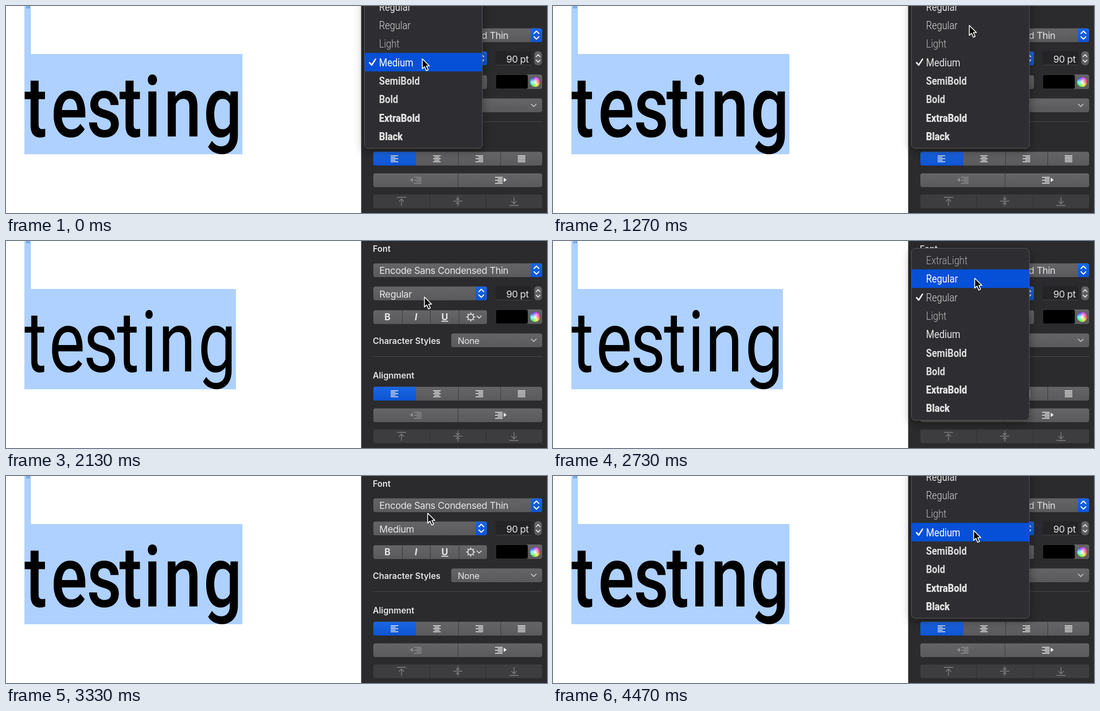
These frames come from a looping animation (1000x384 px, 4540 ms). An HTML page:

```html
<!DOCTYPE html>
<html lang="en">
<head>
<meta charset="utf-8">
<title>Choosing a font weight</title>
<style>
html, body { margin: 0; width: 100%; height: 100%; overflow: hidden; background: #fff; }
svg { display: block; width: 100%; height: 100%; }
text { font-family: Inter, "Liberation Sans", sans-serif; fill: #e6e6e7; white-space: pre; }
.label { font-size: 15.5px; font-weight: 600; }
.value { font-size: 17.5px; letter-spacing: -.4px; }
.narrow { font-family: Roboto, "Noto Sans", sans-serif; }
.word { font-size: 157px; fill: #000; }
.item { font-size: 20.5px; }
.line { fill: none; stroke-linecap: round; stroke-linejoin: round; }
</style>
</head>
<body>
<svg id="stage" viewBox="0 0 1000 384" preserveAspectRatio="none">
  <defs>
    <linearGradient id="grey" x2="0" y2="1"><stop stop-color="#656466"/><stop offset="1" stop-color="#5a595b"/></linearGradient>
    <linearGradient id="blue" x2="0" y2="1"><stop stop-color="#1a66e4"/><stop offset="1" stop-color="#0d54d2"/></linearGradient>
    <radialGradient id="glow"><stop stop-color="#fff"/><stop offset="1" stop-color="#fff" stop-opacity="0"/></radialGradient>
    <filter id="shadow" x="-20%" y="-20%" width="140%" height="140%">
      <feDropShadow dx="0" dy="5" stdDeviation="9" flood-opacity=".42"/>
    </filter>
  </defs>
</svg>
<script>
const LOOP = 4540, STEPS = 68, ROW = 34.3;
const WORD_SCALE = 0.8, ITEM_SCALE = 0.85;
const stage = document.getElementById("stage");

function add(tag, attrs, parent = stage, content) {
  const node = document.createElementNS("http://www.w3.org/2000/svg", tag);
  for (const key in attrs) node.setAttribute(key, attrs[key]);
  if (content !== undefined) node.textContent = content;
  parent.appendChild(node);
  return node;
}
const set = (node, attrs) => { for (const key in attrs) node.setAttribute(key, attrs[key]); };
const box = (x, y, width, height, fill, rx = 0, parent) => add("rect", { x, y, width, height, fill, rx }, parent);
const label = (x, y, content, cls, more = {}) => add("text", { x, y, class: cls, ...more }, stage, content);
const line = (d, stroke, width = 1.6, parent) =>
  add("path", { d, stroke, "stroke-width": width, class: "line" }, parent);

// Document with the selected word
const selection = box(34, 89, 403, 186, "#aed1ff");
box(34, 0, 12, 89.5, "#aed1ff");
line("M39 0V4M42.6 0V4", "#4b7fcb", 1.6);
const word = add("text", { class: "narrow word", y: 242.5, transform: `scale(${WORD_SCALE} 1)` }, stage, "testing");
const LOOKS = {
  Medium: { weight: 500, width: 403, at: [34, 83, 149, 209.5, 254.5, 291.5, 365] },
  Regular: { weight: 400, width: 391, at: [34, 79.5, 143, 205, 249, 281.5, 355] }
};

// Inspector panel
box(656.5, 0, 343.5, 384, "#2b2a2c");

function bar(x, y, width, splits = [], fill = "url(#grey)", gap = "#3a393b") {
  box(x, y + .5, width, 25.5, fill, 4);
  for (const s of splits) box(s, y + .5, 1, 25.5, gap);
}
function arrows(x, y) {
  add("path", { d: `M${x} ${y + .5}h17q4 0 4 4v17.5q0 4 -4 4h-17z`, fill: "url(#blue)" });
  line(`M${x + 6} ${y + 10}l4.5 -4.5l4.5 4.5m0 6l-4.5 4.5l-4.5 -4.5`, "#fff", 1.8);
}

label(678, 20, "Font", "label");
bar(679, 41, 312);
label(690, 61, "Encode Sans Condensed Thin", "value");
arrows(970, 41);

bar(679, 84, 210);
const style = label(690, 104.5, "", "value");
arrows(868, 84);
box(905, 84, 66, 26, "#242326");
box(905, 109, 66, 1, "#454446");
label(966, 104.5, "90 pt", "value", { "text-anchor": "end" });
box(976.5, 84, 14, 26, "url(#grey)", 6);
line("M980 94l3.5 -3.8l3.5 3.8m0 6.4l-3.5 3.8l-3.5 -3.8", "#e6e6e7", 1.7);

bar(679, 128, 210, [732, 784, 837]);
const mark = (x, s, more) => label(x, 147, s, "", { "font-size": 17, "font-weight": 700, "text-anchor": "middle", ...more });
mark(705, "B");
mark(758, "I", { "font-style": "italic" });
mark(811, "U", { "text-decoration": "underline" });
for (let i = 0; i < 8; i++)
  add("path", { d: "M859 134.8v-2", stroke: "#e6e6e7", "stroke-width": 2, transform: `rotate(${i * 45} 859 141)` });
add("circle", { cx: 859, cy: 141, r: 5.3, fill: "none", stroke: "#e6e6e7", "stroke-width": 1.7 });
line("M870.5 139l4 4l4 -4", "#e6e6e7");

box(905, 127, 86, 27, "url(#grey)", 4);
box(905.5, 127.5, 59, 26, "#000", 3);
for (let i = 0; i < 24; i++)
  add("path", { d: "M978 141l9 -1.4v2.8z", fill: `hsl(${i * 15} 90% 60%)`, transform: `rotate(${i * 15} 978 141)` });
add("circle", { cx: 978, cy: 141, r: 9, fill: "url(#glow)" });

label(678, 190.5, "Character Styles", "label");
bar(823, 171, 168);
label(835, 190.5, "None", "value", { style: "font-size:16.5px" });
line("M971 182l4.5 4.5l4.5 -4.5", "#c9c9ca");
box(678, 214, 314, 1, "#474648");

label(678, 255, "Alignment", "label");
bar(679, 270, 312, [836, 914]);
add("path", { d: "M758 270.5h-75q-4 0 -4 4v17.5q0 4 4 4h75z", fill: "url(#blue)" });

function rules(x, y, lengths, shift, color, gap = 2.8) {
  lengths.forEach((n, i) => box(x + (14 - n) * shift, y + i * gap, n, 1.4, color));
}
const ragged = [14, 9, 14, 9, 14];
[0, .5, 1].forEach((shift, i) => rules(711 + i * 78.5, 277, ragged, shift, "#f0f0f1"));
rules(946, 277, [14, 14, 14, 14, 14], 0, "#f0f0f1");

bar(679, 310, 312, [835]);
rules(754, 317, ragged, 1, "#8f8e90");
add("path", { d: "M752 318.5v8l-5.5 -4z", fill: "#8f8e90" });
rules(904, 317, ragged, 1, "#f0f0f1");
add("path", { d: "M920 318.5v8l5.5 -4z", fill: "#f0f0f1" });

bar(679, 349, 312, [783, 887], "#3d3c3e", "#2f2e30");
line("M723 355h16M731 370v-12m-4.5 4.5l4.5 -4.5l4.5 4.5", "#807f81", 1.4);
line("M827 362h16M835 353v7m-3 -3l3 3l3 -3M835 371v-7m-3 3l3 -3l3 3", "#807f81", 1.4);
line("M931 370h16M939 355v12m-4.5 -4.5l4.5 4.5l4.5 -4.5", "#807f81", 1.4);

// Weight menu
const ITEMS = [
  ["ExtraLight", 300, "#aeadaf"], ["Regular", 400, "#dededf"], ["Regular", 300, "#d8d8d9"],
  ["Light", 300, "#bdbdbe"], ["Medium", 400, "#e4e4e5"], ["SemiBold", 600, "#dededf"],
  ["Bold", 700, "#dededf"], ["ExtraBold", 800, "#e4e4e5"], ["Black", 900, "#e4e4e5"]
];
const menu = add("g", {});
set(box(662.5, 13.5, 218, 319, "#2f2e30", 7, menu), { stroke: "#58575a", filter: "url(#shadow)" });
const glow = box(663, 0, 217, ROW, "#0650d8", 0, menu);
const rows = ITEMS.map(([name, weight], i) => add("text", {
  class: "narrow item", "font-weight": weight,
  transform: `translate(689.5 ${43 + i * ROW}) scale(${ITEM_SCALE} 1)`
}, menu, name));
const check = line("M672 .5l4 4.5l7 -11", "#fff", 2.6, menu);

const pointer = add("path", {
  d: "M0 0V18.4L4.3 14.5L7.4 22L10.8 20.5L7.7 13.2H13.2Z",
  fill: "#000", stroke: "#fff", "stroke-width": 1.6, "stroke-linejoin": "round"
});

// Pointer stops: time, x, y
const STOPS = [
  [0, 769, 98], [600, 769, 98], [930, 769, 36], [1330, 769, 36], [1590, 771, 104],
  [2130, 773, 104], [2400, 775, 104], [2660, 779, 69], [3340, 779, 69], [3700, 777, 101], [LOOP, 777, 101]
];
// Menu appearances, counted in steps
const MENUS = [
  { open: 0, blink: 19, close: 21, checked: 4, chosen: 2 },
  { open: 34, blink: 43, close: 45, checked: 2, chosen: 1 },
  { open: 58, blink: -1, close: STEPS, checked: 4 }
];
const FADE = [.6, .25];

function pointerAt(t) {
  const i = Math.max(1, STOPS.findIndex(s => s[0] >= t));
  const [t0, x0, y0] = STOPS[i - 1], [t1, x1, y1] = STOPS[i];
  const u = (t - t0) / (t1 - t0), k = u * u * (3 - 2 * u);
  return [x0 + (x1 - x0) * k, y0 + (y1 - y0) * k];
}

function drawMenu(step, y) {
  const m = MENUS.find(m => step >= m.open && step < m.close + FADE.length);
  menu.style.display = m ? "" : "none";
  if (!m) return;
  const shift = (2 - m.checked) * ROW;
  const hover = step === m.blink ? -1 : Math.round((y - 36 - shift) / ROW);
  const active = step >= m.close ? m.chosen : hover;
  set(menu, { transform: `translate(0 ${shift})`, opacity: step < m.close ? 1 : FADE[step - m.close] });
  set(glow, { y: 18.4 + active * ROW, opacity: active < 0 ? 0 : 1 });
  rows.forEach((row, i) => { row.style.fill = i === active ? "#fff" : ITEMS[i][2]; });
  set(check, { transform: `translate(0 ${36 + m.checked * ROW})` });
}

function draw(time) {
  const step = Math.floor((time % LOOP + 10) / LOOP * STEPS) % STEPS;
  const [x, y] = pointerAt(step * LOOP / STEPS);
  const name = step >= 25 && step < 49 ? "Regular" : "Medium";
  const look = LOOKS[name];
  style.textContent = name;
  set(selection, { width: look.width });
  set(word, { "font-weight": look.weight, x: look.at.map(v => v / WORD_SCALE).join(" ") });
  drawMenu(step, y);
  set(pointer, { transform: `translate(${x + .5} ${y})` });
}

const start = performance.now();
function tick() {
  draw(performance.now() - start);
  requestAnimationFrame(tick);
}
tick();
</script>
</body>
</html>
```
